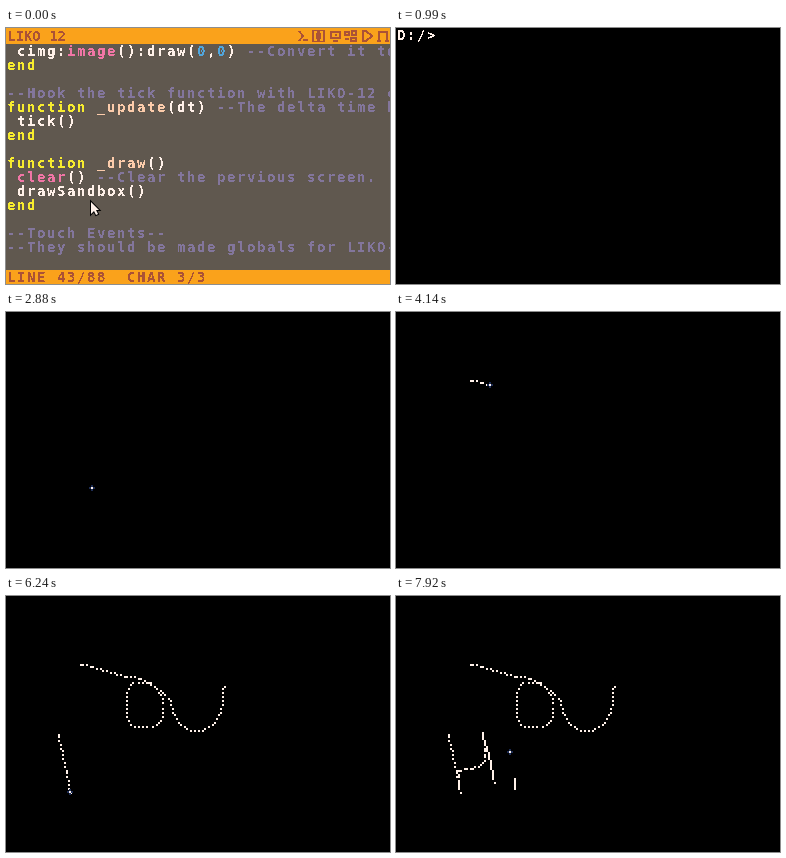
Write an HTML page with a canvas that moves like this. It is 384x256 px and loops after 8 s.

```html
<!DOCTYPE html>
<html lang="en">
<head>
<meta charset="utf-8">
<title>Code, run, draw</title>
<style>
  html, body { margin: 0; width: 100%; height: 100%; overflow: hidden; background: #000; }
  #stage { position: relative; width: 384px; height: 256px; overflow: hidden; background: #000; }
  #stage > *, #editor > * { position: absolute; left: 0; top: 0; }
  #editor { width: 384px; height: 256px; overflow: hidden; background: #60584f; }
  pre {
    margin: 0; white-space: pre; color: #fff1e9; filter: url(#crisp);
    font: bold 14px/14px "DejaVu Sans Mono", "Liberation Mono", monospace;
    letter-spacing: calc(10px - 1ch);
  }
  pre * { font-weight: inherit; font-style: normal; text-decoration: none; }
  b { color: #f7ec2f; }
  i { color: #83769c; }
  u { color: #f176a6; }
  s { color: #51a6dc; }
  em { color: #fcccab; }
  .bar { width: 384px; background: #faa21b; }
  #stage pre { left: 1px; }
  #stage .label { color: #ab5236; }
  #stage #code { top: 16px; }
  #stage #caret { width: 10px; height: 10px; background: #ab5236; }
</style>
</head>
<body>
<div id="stage">
  <canvas id="paint" width="384" height="256"></canvas>
  <div id="editor">
    <div class="bar" style="height:16px"></div>
    <div class="bar" style="top:242px;height:14px"></div>
    <pre class="label" style="top:1px;letter-spacing:0">LIKO 12</pre>
    <pre class="label" style="top:242px">LINE 43/88  CHAR 3/3</pre>
    <pre id="code"> cimg:<u>image</u>():draw(<s>0</s>,<s>0</s>) <i>--Convert it to</i>
<b>end</b>

<i>--Hook the tick function with LIKO-12 c</i>
<b>function</b> <em>_update</em>(dt) <i>--The delta time b</i>
 tick()
<b>end</b>

<b>function</b> <em>_draw</em>()
 <u>clear</u>() <i>--Clear the pervious screen.</i>
 drawSandbox()
<b>end</b>

<i>--Touch Events--</i>
<i>--They should be made globals for LIKO-</i></pre>
    <svg width="384" height="256" fill="none" stroke="#ab5236" stroke-width="2" shape-rendering="crispEdges">
      <defs>
        <filter id="crisp" color-interpolation-filters="sRGB">
          <feComponentTransfer><feFuncA type="discrete" tableValues="0 1"/></feComponentTransfer>
        </filter>
      </defs>
      <path d="M293 3l4 5-4 5M297 12h5"/>
      <path d="M306 2h13v12h-13z" fill="#ab5236" stroke="none"/>
      <path d="M311 4h-2v8h2M314 4h2v8h-2" stroke="#faa21b"/>
      <path d="M325 4h9v6h-9zM327 13h5M329 7h2"/>
      <path d="M339 4h4v3h-4zM346 3h4v4h-4zM339 11h4M345 10h5v3h-5z"/>
      <path d="M357 3v10h3l6-5-6-5z"/>
      <path d="M373 13V4h8v9M371 13h4M379 13h4"/>
    </svg>
  </div>
  <pre id="prompt"></pre>
  <div id="caret"></div>
  <svg id="arrow" width="384" height="256">
    <path d="M85 174v12l3-3 2 4 2-1-2-4h3z" fill="#fff1e9" stroke="#000" stroke-width="2" paint-order="stroke"/>
  </svg>
</div>
<script>
const LOOP = 8000, RUN = 990, CLEAR = 2880, FRAME = 30, SAMPLE = 15;
const $ = id => document.getElementById(id);
const ctx = $("paint").getContext("2d");

// The pointer follows each curve at constant speed; the pen leaves dots.
const moves = [], dots = [];
let clock = CLEAR, tip = { x: 86, y: 176 };

function rest(until) { clock = until; }

function move(until, curve) {
  const path = document.createElementNS("http://www.w3.org/2000/svg", "path");
  path.setAttribute("d", `M${tip.x} ${tip.y}${curve}`);
  const from = clock, length = path.getTotalLength();
  const at = t => path.getPointAtLength(length * Math.min(1, (t - from) / (until - from)));
  moves.push({ from, at });
  clock = until;
  tip = at(until);
  return { from, until, at };
}

function draw(until, curve) {
  const m = move(until, curve);
  for (let t = m.from; t <= until; t += SAMPLE) {
    const { x, y } = m.at(t);
    dots.push({ t, x: 2 * Math.floor(x / 2), y: 2 * Math.floor(y / 2) });
  }
}

// A flourish: line, loop, bowl.
rest(3180);
move(3360, "L70 170");
rest(3570);
move(4020, "Q73 110 74 68");
rest(4050);
draw(4380, "L118 80Q138 82 148 90");
draw(4875, "Q157 97 157 109C157 128 156 131 139 131S121 128 121 109S122 87 136 87Q145 87 148 90");
draw(5370, "Q166 101 168 117C174 138 192 136 200 133C216 125 217 108 218 90");
// The letter H.
rest(5490);
move(5970, "Q160 165 52 138");
rest(6000);
draw(6240, "Q59 165 64 196");
rest(6270);
draw(6690, "L62 174C86 175 96 166 86 136");
rest(6810);
draw(7170, "Q94 160 98 186");
// The stem of the i.
rest(7230);
move(7470, "Q118 202 118 192");
rest(7500);
draw(7620, "V183");
move(7920, "Q110 140 114 156");

const dot = (x, y) => ctx.fillRect(x, y, 2, 2);

function drawSandbox(t) {
  ctx.fillStyle = "#fff1e9";
  for (const d of dots) if (d.t <= t) dot(d.x, d.y);

  const now = moves.filter(m => m.from <= t).pop();
  const p = now ? now.at(t) : { x: 86, y: 176 };
  const x = Math.floor(p.x) - 1, y = Math.floor(p.y) - 1;
  ctx.fillStyle = "#1c2b53";
  for (const d of [-2, 2]) {
    dot(x + d, y);
    dot(x, y + d);
  }
  ctx.fillStyle = "#fff1e9";
  dot(x, y);
}

const show = (el, on) => { el.style.visibility = on ? "visible" : "hidden"; };
// The caret switches every 450 ms, starting dark.
const blink = t => Math.floor((t + 150) / 450) % 2 === 1;

function render(time) {
  const t = Math.floor(time / FRAME) * FRAME;
  const editing = t < RUN, terminal = !editing && t < CLEAR;
  const typed = [2010, 2310, 2610].filter(k => t >= k).length;

  show($("editor"), editing);
  show($("arrow"), editing);
  show($("prompt"), terminal);
  const line = "D:/> " + "run".slice(0, typed);
  if ($("prompt").textContent !== line) $("prompt").textContent = line;

  const caret = $("caret");
  show(caret, editing ? blink(t) : terminal && blink(t - RUN));
  caret.style.left = (editing ? 32 : 52 + 10 * typed) + "px";
  caret.style.top = (editing ? 172 : 2) + "px";

  ctx.clearRect(0, 0, 384, 256);
  if (t >= CLEAR) drawSandbox(t);
}

const start = performance.now();
function tick() {
  render((performance.now() - start) % LOOP);
  requestAnimationFrame(tick);
}
tick();
</script>
</body>
</html>
```
